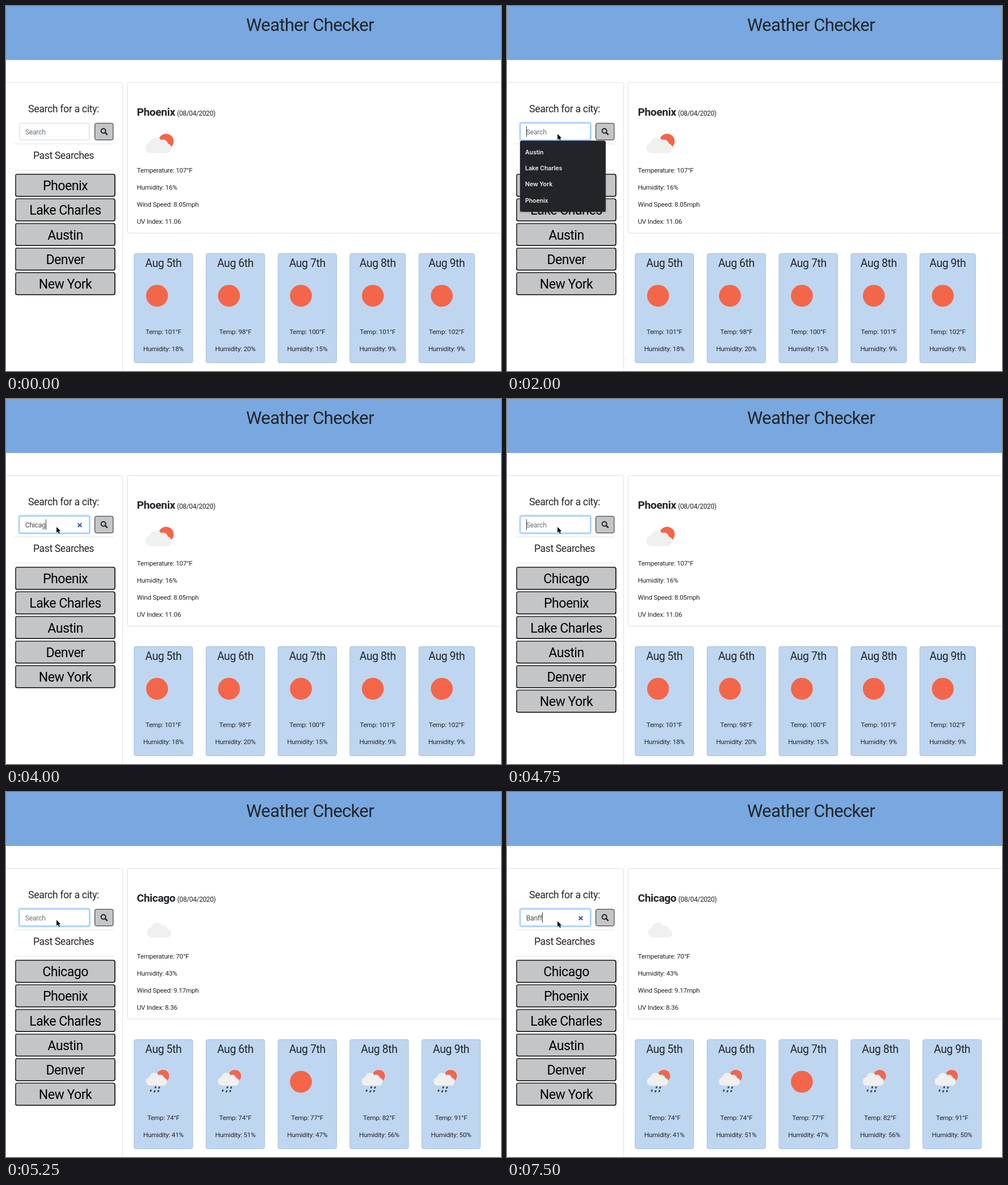
Animation of 872x642 px, one loop 8 s. Source, as an HTML page:

```html
<!DOCTYPE html>
<html lang="en">
<head>
<meta charset="utf-8">
<title>Weather Checker</title>
<style>
html, body { margin: 0; width: 100%; height: 100%; overflow: hidden; background: #fff; }
svg { display: block; width: 872px; height: 642px; }
text { font-family: Roboto, "Open Sans", sans-serif; letter-spacing: -.02em; fill: #212529; white-space: pre; }
.city { fill: #000; }
.menu text { font: 600 10.4px Inter, "Liberation Sans", sans-serif; letter-spacing: 0; fill: #f4f4f5; }
</style>
</head>
<body>
<svg id="stage" viewBox="0 0 872 642" xmlns="http://www.w3.org/2000/svg"></svg>
<script>
const LOOP = 8000;
const SUN = '#f4664a', CLOUD = '#f0f0ef', CARD = '#bfd6f0', INK = '#212529', BUTTON = '#c4c5c7';
const stage = document.getElementById('stage');

const phoenix = {
  city: 'Phoenix', icon: 'partly', temp: 107, humidity: 16, wind: '8.05', uv: '11.06'
};
const chicago = {
  city: 'Chicago', icon: 'cloudy', temp: 70, humidity: 43, wind: '9.17', uv: '8.36'
};
const dryForecast = [[101, 18], [98, 20], [100, 15], [101, 9], [102, 9]].map(([temp, humidity]) => ({ temp, humidity }));
const wetForecast = [[74, 41], [74, 51], [77, 47], [82, 56], [91, 50]].map(([temp, humidity], i) => ({ temp, humidity, rain: i !== 2 }));
const oldCities = ['Phoenix', 'Lake Charles', 'Austin', 'Denver', 'New York'];

// Each step changes part of the state from its time on.
const steps = [
  [0, { now: phoenix, days: dryForecast, cities: oldCities, query: '', loading: false }],
  [750, { pointer: [148, 186] }],
  [1000, { pointer: [94, 220] }],
  [1250, { pointer: [89, 225] }],
  [2000, { focus: true, caret: true, menu: true }],
  [2500, { caret: false }],
  [3000, { menu: false, caret: true, query: 'C' }],
  [3250, { query: 'Chi' }],
  [3500, { query: 'Chic' }],
  [3750, { query: 'Chica' }],
  [4000, { query: 'Chicag' }],
  [4250, { query: 'Chicago' }],
  [4750, { query: '', cities: ['Chicago', ...oldCities] }],
  [5000, { now: chicago, loading: true }],
  [5250, { loading: false, days: wetForecast, caret: false }],
  [5750, { caret: true, pointer: [89, 226] }],
  [6000, { pointer: [89, 227] }],
  [6250, { caret: false }],
  [6750, { caret: true, query: 'B' }],
  [7000, { query: 'Ba' }],
  [7250, { query: 'Ban' }],
  [7500, { query: 'Banff' }]
];

const text = (x, y, size, str, extra = '') => `<text x="${x}" y="${y}" font-size="${size}" ${extra}>${str}</text>`;
const centered = (x, y, size, str, extra = '') => text(x, y, size, str, 'text-anchor="middle" ' + extra);
const rect = (x, y, w, h, fill, stroke = 'none', extra = '') =>
  `<rect x="${x}" y="${y}" width="${w}" height="${h}" rx="3" fill="${fill}" stroke="${stroke}" ${extra}/>`;
const circle = (x, y, r, fill) => `<circle cx="${x}" cy="${y}" r="${r}" fill="${fill}"/>`;
const path = (d, stroke, width, extra = 'fill="none"') => `<path d="${d}" stroke="${stroke}" stroke-width="${width}" ${extra}/>`;
const move = (x, y, body, scale = 1) => `<g transform="translate(${x} ${y}) scale(${scale})">${body}</g>`;

const cloudPath = 'M9.5 30A9.4 9.4 0 0 1 9.3 11.4A10 10 0 0 1 28.6 9A6.8 6.8 0 0 1 39.5 14A8.2 8.2 0 0 1 40.5 30Z';
const cloud = path(cloudPath, 'none', 0, `fill="${CLOUD}"`);
const sunnyCloud = back => circle(38, 9.3, 13.4, SUN) + path(cloudPath, back, 2.6, `fill="${back}"`) + cloud;
const drops = [[23, 31.5], [31, 32], [13, 38.5], [21, 40], [29, 39.5]]
  .map(([x, y]) => path(`M${x} ${y}l-2 4`, '#3c3c42', 3)).join('');

function searchButton() {
  return rect(156.5, 206.2, 32.3, 29.4, BUTTON, INK) +
    `<circle cx="171.6" cy="219.7" r="4" fill="none" stroke="${INK}" stroke-width="2"/>` +
    path('M174.6 222.7l4 4', INK, 2.5);
}

function searchField({ focus, query, caret }) {
  const ring = focus ? rect(22.5, 204.8, 125.4, 31.8, 'none', '#bfdeff', 'stroke-width="2.6"') : '';
  const box = rect(23.7, 206.2, 123, 29.4, '#fff', focus ? '#80bdff' : '#ced4da');
  const label = text(33.7, 226, 12.2, query || 'Search', `id="query" style="fill:${query ? '#495057' : '#6c757d'}"`);
  const clear = query ? path('M126.7 218.7l6.6 6.6m0-6.6l-6.6 6.6', '#35559b', 2) : '';
  return ring + box + label + clear + (caret ? path('M34.5 211.5v18.5', '#343a40', 1, 'id="caret"') : '');
}

function cityButton(name, i) {
  const y = 296 + i * 43.25;
  return rect(16.9, y, 174.9, 38.7, BUTTON, '#000', 'stroke-width="1.6"') +
    path(`M16.9 ${y + 36}V${y + 3}q0 -3 3 -3H189`, '#4d4d4f', 1.6) +
    centered(104.5, y + 28, 23, name, 'class="city"');
}

function sidebar(s) {
  const lines = [242.5, 289].map(y => path(`M14 ${y}H189`, '#e4e4e4', 1)).join('');
  return rect(-10, 134.5, 215.5, s.loading ? 452 : 560, '#fff', '#dfdfdf') +
    centered(101.5, 186.5, 17.7, 'Search for a city:') + lines +
    searchField(s) + searchButton() +
    centered(101.5, 269, 17.5, 'Past Searches') + s.cities.map(cityButton).join('');
}

function current({ now, loading }) {
  const rows = [`Temperature: ${now.temp}°F`, `Humidity: ${now.humidity}%`, `Wind Speed: ${now.wind}mph`];
  if (!loading) rows.push(`UV Index: ${now.uv}`);
  const icon = now.icon === 'partly' ? move(244, 228.8, sunnyCloud('#fff')) : move(246.8, 227.3, cloud, .95);
  const firstRow = loading ? 214.5 : 293;
  return rect(213.5, 134.5, 700, loading ? 221.5 : 265, '#fff', '#dfdfdf') +
    text(230.5, 193, 19.2, `<tspan font-weight="700">${now.city}</tspan><tspan font-size="12" dx="3.5">(08/04/2020)</tspan>`) +
    (loading ? '' : icon) +
    rows.map((row, i) => text(230.5, firstRow + i * 29.9, 11.7, row)).join('');
}

function forecast(days) {
  let x = 225.7;
  return days.map(({ temp, humidity, rain }, i) => {
    const width = humidity < 10 ? 98 : 103.2, mid = x + width / 2;
    const icon = rain ? move(x + 19.6, 492, sunnyCloud(CARD) + drops, .82) : circle(x + 40.4, 509.7, 19.3, SUN);
    const card = rect(x, 435.5, width, 192, CARD, '#a6bfdc') +
      centered(mid, 459, 19.4, `Aug ${i + 5}th`) + icon +
      centered(mid, 577, 11.7, `Temp: ${temp}°F`) +
      centered(mid, 607, 11.7, `Humidity: ${humidity}%`);
    x += width + 23.5;
    return card;
  }).join('');
}

function menu() {
  const names = ['Austin', 'Lake Charles', 'New York', 'Phoenix'];
  return rect(22, 238, 153, 126, 'rgba(0,0,0,.14)') + rect(23, 236.8, 150.8, 125.2, '#232428') +
    `<g class="menu">${names.map((name, i) => text(32, 261 + i * 28.2, 10.4, name)).join('')}</g>`;
}

const pointer = ([x, y]) => move(x, y,
  path('M0 0V10.2L2.3 8.1L4.1 11.9L5.8 11.1L4.1 7.4H7.2Z', '#fff', 1, 'fill="#000" paint-order="stroke"'));

function draw(s) {
  stage.innerHTML = '<rect width="872" height="95" fill="#78a8df"/>' +
    centered(535.5, 43.5, 31, 'Weather Checker') +
    move(0, s.loading ? -22 : 0, sidebar(s) + current(s)) +
    move(0, s.loading ? -65 : 0, forecast(s.days)) +
    (s.menu ? menu() : '') + (s.pointer ? pointer(s.pointer) : '');
  const caret = document.getElementById('caret');
  if (caret && s.query) {
    const width = document.getElementById('query').getComputedTextLength();
    caret.setAttribute('transform', `translate(${Math.round(width - .5)} 0)`);
  }
}

let shown = -1;
function tick() {
  const time = performance.now() % LOOP;
  const past = steps.filter(([start]) => start <= time);
  if (past.length !== shown) {
    shown = past.length;
    draw(Object.assign({}, ...past.map(([, change]) => change)));
  }
  requestAnimationFrame(tick);
}
tick();
</script>
</body>
</html>
```
